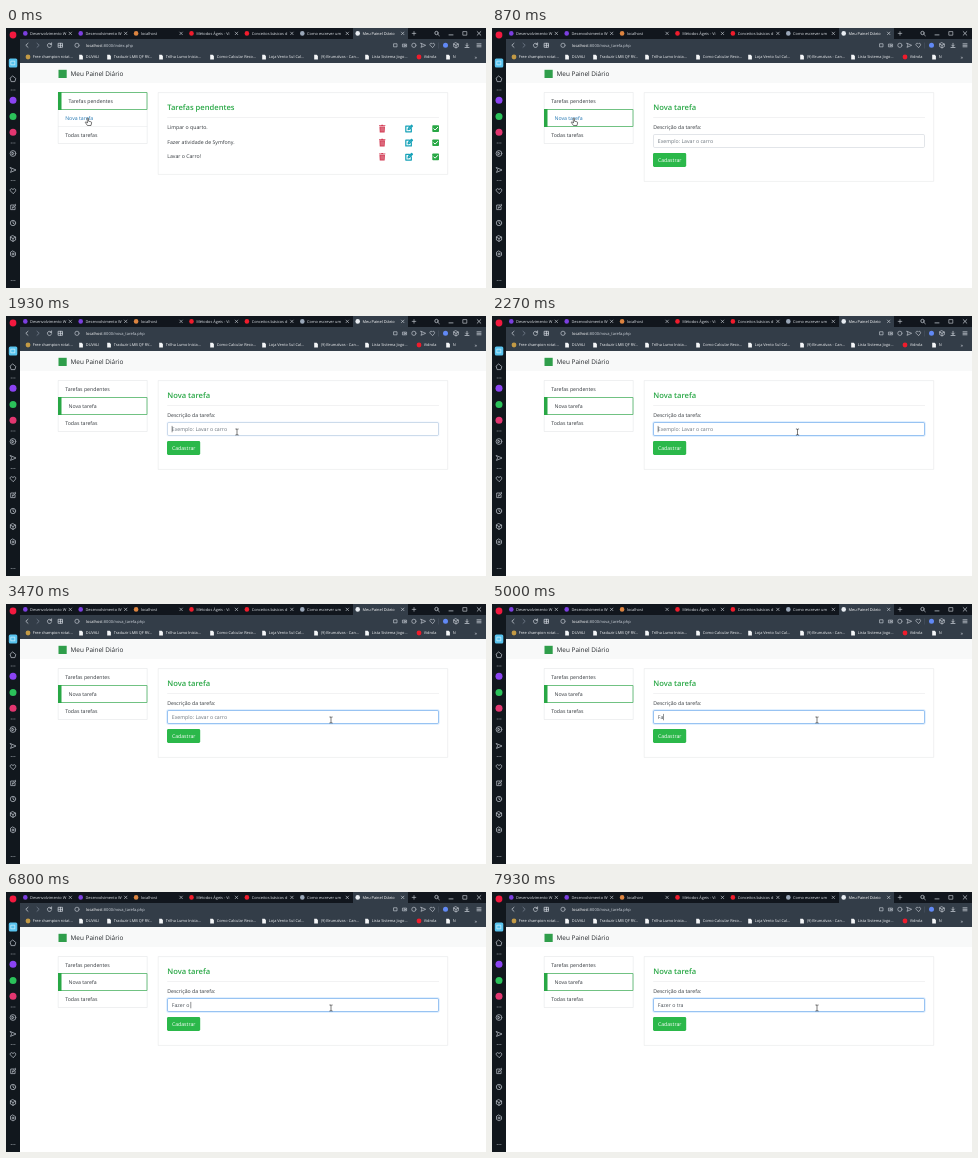
These frames come from a looping animation (480x260 px, 8 s). An HTML page with a canvas:

```html
<!DOCTYPE html>
<html lang="pt-BR">
<head>
<meta charset="utf-8">
<title>Lista de tarefas</title>
<style>
  html, body { margin: 0; width: 100%; height: 100%; overflow: hidden; background: #fff; }
  canvas { display: block; width: 480px; height: 260px; }
</style>
</head>
<body>
<canvas id="stage"></canvas>
<script>
const LOOP = 8000;
const FONT = '"Open Sans", "Noto Sans", sans-serif';
const GREEN = '#28a745', INK = '#33383d', PALE = '#d3d8e0';
const canvas = document.getElementById('stage');
const ratio = window.devicePixelRatio || 1;
canvas.width = 480 * ratio;
canvas.height = 260 * ratio;
const ctx = canvas.getContext('2d');

// --- drawing helpers -------------------------------------------------
function rect(x, y, w, h, color) {
  ctx.fillStyle = color;
  ctx.fillRect(x, y, w, h);
}
function frame(x, y, w, h, color, width = 0.5, radius = 0) {
  ctx.strokeStyle = color;
  ctx.lineWidth = width;
  ctx.beginPath();
  ctx.roundRect(x, y, w, h, radius);
  ctx.stroke();
}
function panel(x, y, w, h, color, radius) {
  ctx.fillStyle = color;
  ctx.beginPath();
  ctx.roundRect(x, y, w, h, radius);
  ctx.fill();
}
function dot(x, y, r, color) {
  ctx.fillStyle = color;
  ctx.beginPath();
  ctx.arc(x, y, r, 0, 7);
  ctx.fill();
}
function text(str, x, y, size, color, weight = 400) {
  ctx.font = `${weight} ${size}px ${FONT}`;
  ctx.fillStyle = color;
  ctx.fillText(str, x, y);
  return ctx.measureText(str).width;
}
function clipped(str, x, y, width, size, color) {
  ctx.save();
  ctx.beginPath();
  ctx.rect(x, y - 6, width, 9);
  ctx.clip();
  text(str, x, y, size, color, 500);
  ctx.restore();
}
// Paths are written around their own centre.
function icon(path, x, y, color, { fill = false, width = 0.7, scale = 1 } = {}) {
  ctx.save();
  ctx.translate(x, y);
  ctx.scale(scale, scale);
  ctx.lineWidth = width;
  ctx.lineCap = ctx.lineJoin = 'round';
  ctx.strokeStyle = ctx.fillStyle = color;
  const shape = new Path2D(path);
  fill ? ctx.fill(shape) : ctx.stroke(shape);
  ctx.restore();
}

const ICON = {
  close: 'M-1.3-1.3L1.3 1.3M1.3-1.3L-1.3 1.3',
  plus: 'M-1.8 0H1.8M0-1.8V1.8',
  minus: 'M-2 1.5H2',
  square: 'M-1.8-1.8H1.8V1.8H-1.8Z',
  search: 'M1.2-.4A1.7 1.7 0 1 1-2.2-.4A1.7 1.7 0 1 1 1.2-.4M.8.9L2.3 2.3',
  back: 'M1-2L-1.2 0L1 2',
  forward: 'M-1-2L1.2 0L-1 2',
  reload: 'M1.8-1.1A2.1 2.1 0 1 0 2.1.5M2.1-2.4V-.9H.6',
  grid: 'M-2-2H2V2H-2ZM0-2V2M-2 0H2',
  ring: 'M2.5 0A2.5 2.5 0 1 1-2.5 0A2.5 2.5 0 1 1 2.5 0',
  page: 'M-1.8-2.3H.7L1.9-1.1V2.4H-1.8Z',
  camera: 'M-2.2-1.4H2.2V1.8H-2.2ZM.8.2A.8.8 0 1 1-.8.2A.8.8 0 1 1 .8.2',
  send: 'M-2.5-2.4L3 0L-2.5 2.4L-1.5 0Z',
  heart: 'M0 2.5L-2.6-.1C-3.6-2-1-3.4 0-1.4C1-3.4 3.6-2 2.6-.1Z',
  home: 'M0-2.8L2.8-.5L1.9 2.6H-1.9L-2.8-.5Z',
  cube: 'M0-2.8L2.6-1.4V1.5L0 2.9L-2.6 1.5V-1.4ZM-2.6-1.4L0 0L2.6-1.4M0 0V2.9',
  edit: 'M.6-2H-2.3V2.6H2.1V0M-.5.9L-.2-.4L2.3-2.7L3-2L.6.5Z',
  clock: 'M2.7 0A2.7 2.7 0 1 1-2.7 0A2.7 2.7 0 1 1 2.7 0M0-1.5V.2L1.2 1',
  play: 'M2.9 0A2.9 2.9 0 1 1-2.9 0A2.9 2.9 0 1 1 2.9 0M-.7-1.2L1.2 0L-.7 1.2Z',
  gear: 'M0-2.9L2.5-1.4V1.4L0 2.9L-2.5 1.4V-1.4ZM1 0A1 1 0 1 1-1 0A1 1 0 1 1 1 0',
  more: 'M-1.8 0H-1.7M0 0H.1M1.8 0H1.9',
  download: 'M0-2V1M-1.3-.2L0 1.1L1.3-.2M-2 2.2H2',
  menu: 'M-2-1.5H2M-2 0H2M-2 1.5H2',
  tick: 'M-1.9.1L-.6 1.4L2-1.3',
  bin: 'M-3-3.2H-1L-.7-3.7H.7L1-3.2H3V-2.4H-3ZM-2.6-2H2.6L2.3 3.6H-2.3Z',
  binLines: 'M-1.1-.9V2.4M0-.9V2.4M1.1-.9V2.4',
  arrow: 'M0 0V8.2L1.9 6.5L3.1 9.2L4.3 8.7L3.1 6.1H5.7Z',
  hand: 'M-.8.1C-.8-.8.5-.8.5.1V2.7L3 3.3Q3.7 3.5 3.6 4.4L3 7H-.6L-2.6 4.1C-2.9 3.3-1.9 3-1.5 3.6L-.8 4.3Z',
  beam: 'M-1.2-3H-.4L0-2.6L.4-3H1.2M0-2.6V2.6M-1.2 3H-.4L0 2.6L.4 3H1.2'
};

// --- browser chrome --------------------------------------------------
const TABS = [
  ['#7c3fe0', 'Desenvolvimento W'], ['#7c3fe0', 'Desenvolvimento W'],
  ['#dd8440', 'localhost'], ['#f01c2c', 'Métodos Ágeis - Vi'],
  ['#f01c2c', 'Conceitos básicos d'], ['#9aa7b8', 'Como escrever um'],
  ['#e9edf2', 'Meu Painel Diário']
];
const BOOKMARKS = [
  [22, 'Free champion rotat...', '#c39a45'], [75, 'DUVALI'],
  [103, 'Traduzir LMB QF RV...'], [155, 'Trilha Lumo Inicia...'],
  [206, 'Como Calcular Reco...'], [258, 'Loja Vento Sul Cal...'],
  [310, '(9) Brumalvas - Can...'], [361, 'Lista Sistema Jogo...'],
  [413, 'Vidrola', '#f01c2c'], [442, 'N']
];
const SIDEBAR = [
  ['home', 51], ['more', 62], ['more', 115], ['play', 125.5], ['send', 142],
  ['more', 152.5], ['heart', 163], ['edit', 179], ['clock', 195],
  ['cube', 210.5], ['gear', 226], ['more', 252.5]
];

function drawBrowser(url) {
  rect(0, 0, 480, 11, '#11161d');
  rect(14, 11, 466, 24, '#333d48');
  rect(347, 0, 55, 11, '#333d48');
  rect(0, 0, 14, 260, '#11171d');

  TABS.forEach(([color, label], i) => {
    const x = 19.3 + i * 55.4;
    dot(x, 5.4, 2.3, color);
    clipped(label, x + 4.8, 6.9, 37, 3.9, i === 6 ? '#fff' : '#dfe3e8');
    icon(ICON.close, x + 45, 5.4, PALE, { width: 0.6 });
  });
  icon(ICON.plus, 408, 5.4, PALE, { width: 0.6 });
  icon(ICON.search, 431, 5.4, PALE);
  icon(ICON.minus, 445, 5.4, PALE);
  icon(ICON.square, 459, 5.4, PALE, { width: 0.6 });
  icon(ICON.close, 473, 5.4, PALE, { scale: 1.4, width: 0.5 });

  icon(ICON.back, 21, 17.3, PALE);
  icon(ICON.forward, 32, 17.3, '#7f8998');
  icon(ICON.reload, 43.5, 17.3, PALE);
  icon(ICON.grid, 54.5, 17.3, PALE);
  icon(ICON.ring, 71, 17.3, PALE, { scale: 0.85 });
  const hostWidth = text('localhost', 80, 18.9, 4, '#fff', 500);
  text(':8000/' + url, 80 + hostWidth, 18.9, 4, '#ced4db', 500);
  ['square', 'camera', 'ring', 'send', 'heart'].forEach((name, i) =>
    icon(ICON[name], 389.5 + i * 9.2, 17.3, PALE, { scale: 0.85 }));
  rect(432.3, 14.5, 0.4, 6, '#566170');
  dot(439.5, 17.3, 2.5, '#6189f5');
  icon(ICON.cube, 450, 17.3, PALE, { scale: 0.9 });
  icon(ICON.download, 461, 17.3, PALE);
  icon(ICON.menu, 473, 17.3, PALE);

  for (const [x, label, color] of BOOKMARKS) {
    color ? dot(x, 29, 2.4, color) : icon(ICON.page, x, 29, '#f4f6f8', { fill: true });
    clipped(label, x + 4.8, 30.4, 41.5, 3.9, '#f2f4f6');
  }
  text('»', 468.5, 30.6, 5, PALE);

  dot(7, 7, 3.4, '#f3193f');
  panel(2.8, 30.5, 8.5, 9, '#58c3ee', 1.5);
  icon(ICON.square, 7, 35, '#e9f8ff', { width: 0.6 });
  dot(7, 72.3, 3.5, '#8b43f2');
  dot(7, 88.4, 3.5, '#2bc25a');
  dot(7, 104.3, 3.5, '#e23670');
  for (const [name, y] of SIDEBAR) icon(ICON[name], 7, y, '#c3c9d1');
}

// --- page ------------------------------------------------------------
const MENU = ['Tarefas pendentes', 'Nova tarefa', 'Todas tarefas'];
const TASKS = ['Limpar o quarto.', 'Fazer atividade de Symfony.', 'Lavar o Carro!'];
const MENU_TOP = 64.5, MENU_STEP = 17;

function drawMenu(active, hovered) {
  frame(52.2, MENU_TOP, 89, 3 * MENU_STEP, '#dfe1e3');
  MENU.forEach((label, i) => {
    const y = MENU_TOP + i * MENU_STEP;
    if (i) rect(52, y, 89.2, 0.4, '#dfe1e3');
    text(label, i === active ? 62.5 : 59.2, y + 10.5, 5.2, i === hovered ? '#2277b2' : INK);
  });
  const y = MENU_TOP + active * MENU_STEP;
  frame(52.5, y, 88.5, MENU_STEP, '#62bd77', 0.9);
  rect(52, y - 0.5, 3.5, MENU_STEP + 1, GREEN);
}

function drawCard(title, height) {
  frame(152.2, 64.6, 289.5, height, '#e1e3e5');
  text(title, 161.2, 81.8, 7.6, GREEN, 600);
  rect(161.2, 89, 271.8, 0.4, '#dddfe1');
}

function drawTasks() {
  drawCard('Tarefas pendentes', 81.8);
  TASKS.forEach((task, i) => {
    const y = 100.6 + i * 14.1;
    text(task, 161.2, y + 0.8, 5.2, INK);
    icon(ICON.bin, 376.2, y, '#d33f57', { fill: true, scale: 1.06 });
    icon(ICON.binLines, 376.2, y, '#f0b4be', { width: 0.45 });
    icon(ICON.edit, 402.7, y, '#17a2b8', { width: 1, scale: 1.25 });
    panel(426.3, y - 3.3, 6.7, 6.7, GREEN, 0.8);
    icon(ICON.tick, 429.7, y, '#fff', { width: 1 });
  });
}

function drawForm(typed, focus, caret) {
  drawCard('Nova tarefa', 88.8);
  text('Descrição da tarefa:', 161.2, 101.3, 5.2, INK);
  if (focus) frame(161, 106, 272, 14, `rgba(0,123,255,${0.16 * focus})`, 1.4, 1.5);
  frame(161.5, 106.5, 271, 13, '#ced4da', 0.6, 1.2);
  if (focus) frame(161.5, 106.5, 271, 13, `rgba(128,185,245,${0.9 * focus})`, 0.8, 1.2);
  const width = typed ? text(typed, 165.8, 115.2, 5.2, '#495057') : 0;
  if (!typed) text('Exemplo: Lavar o carro', 165.8, 115.2, 5.2, '#6c757d');
  if (caret) rect(165.8 + width, 109.9, 0.5, 6.4, '#22262a');
  panel(161, 125, 33.2, 14, '#2bb84a', 1.4);
  text('Cadastrar', 165.9, 134, 5.2, '#fff');
}

function drawCursor(x, y, kind) {
  if (kind === 'beam') return icon(ICON.beam, x, y, '#222', { width: 0.6 });
  icon(ICON[kind], x, y, '#fff', { fill: true });
  icon(ICON[kind], x, y, '#222', { width: 0.6 });
}

// --- timeline --------------------------------------------------------
const PAGE_LOAD = 800, FOCUS = 1890;
const PHRASE = 'Fazer o tra';
const KEYS = [4670, 4980, 5130, 5200, 5270, 5330, 6600, 6730, 7070, 7200, 7430];

const clamp = v => Math.max(0, Math.min(1, v));
const ease = v => v * v * (3 - 2 * v);
const progress = (t, from, to) => ease(clamp((t - from) / (to - from)));

function draw(t) {
  const cross = progress(t, 930, 1870), slide = progress(t, 1960, 2400);
  const x = 82 + 149 * cross + 94 * slide;
  const y = 90.5 + 25.5 * cross;
  const isForm = t >= PAGE_LOAD;
  const overMenu = x < 141 && y < 116;
  const overInput = isForm && x > 161 && y > 106;
  const hovered = overMenu ? Math.floor((y - MENU_TOP) / MENU_STEP) : -1;

  const count = KEYS.filter(k => k <= t).length;
  const lastInput = count ? KEYS[count - 1] : FOCUS;
  const caret = t >= FOCUS && (t - lastInput) % 1050 < 500;

  ctx.setTransform(ratio, 0, 0, ratio, 0, 0);
  ctx.textRendering = 'geometricPrecision';
  rect(0, 0, 480, 260, '#fff');
  drawBrowser(isForm ? 'nova_tarefa.php' : 'index.php');
  rect(14, 35, 466, 20, '#f8f9f9');
  panel(52.5, 41.8, 8.2, 8.2, '#2f9e4b', 0);
  text('Meu Painel Diário', 64.6, 48.2, 6.4, '#24282c');
  drawMenu(isForm ? 1 : 0, hovered);
  if (isForm) drawForm(PHRASE.slice(0, count), clamp((t - FOCUS) / 150), caret);
  else drawTasks();
  drawCursor(x, y, overInput ? 'beam' : overMenu ? 'hand' : 'arrow');
}

const start = performance.now();
function tick() {
  draw((performance.now() - start) % LOOP);
  requestAnimationFrame(tick);
}
tick();
</script>
</body>
</html>
```
